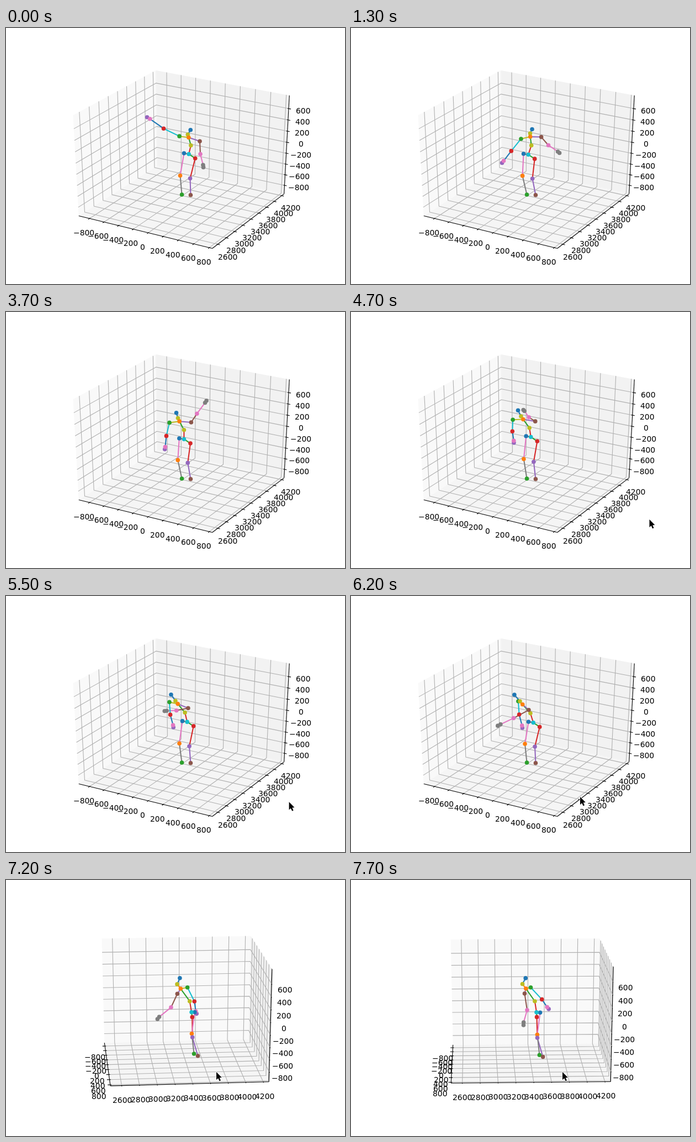
Recreate the animation shown at these times as an HTML page with a canvas. Size 614 by 464 pixels, loop 8 s.

```html
<!DOCTYPE html>
<html lang="en">
<head>
<meta charset="utf-8">
<title>Moving skeleton plot</title>
<style>
html, body { margin: 0; width: 100%; height: 100%; overflow: hidden; background: #fff; }
canvas { display: block; }
</style>
</head>
<body>
<canvas id="stage" width="614" height="464"></canvas>
<script>
const ctx = document.getElementById('stage').getContext('2d');
const LOOP = 8000;

const BLUE = '#1f77b4', ORANGE = '#ff7f0e', GREEN = '#2ca02c', RED = '#d62728', PURPLE = '#9467bd',
      BROWN = '#8c564b', PINK = '#e377c2', GRAY = '#7f7f7f', OLIVE = '#bcbd22', CYAN = '#17becf';
const CYCLE = [BLUE, ORANGE, GREEN, RED, PURPLE, BROWN, PINK, GRAY, OLIVE, CYAN];

// Plot box: a unit cube seen in perspective, padded a little on each side
const HALF = 0.5 + 1 / 48, SPAN = 1719, EYE = 10;
const ORIGIN = [320.7, 232.4], SCALE = [2681, 1997.8];
const AXES = [
  { mid: -56, from: -800, to: 800, dir: 1, pane: '#f9f9f9' },
  { mid: 3369, from: 2600, to: 4200, dir: 0, pane: '#f2f2f2' },
  { mid: -66, from: -800, to: 600, dir: 0, pane: '#f5f5f5' }
];
const TICK = 1 / 12, LABEL_GAP = 0.0738;

// Update moments of the slow first part, then pauses in the 100 ms rhythm
const STEPS = [0, 300, 500, 800, 1000, 1300, 1600, 1900, 2300, 2700, 2900, 3200, 3400, 3700, 4000];
const CURSOR_IN = 4300;
const PAUSES = [[4700, 5000], [5000, 5400], [6700, 6900], [7200, 7500], [7700, LOOP]];

// Key points: time, then azimuth and elevation, screen x and y, or plot x, y, z
const VIEW = [[6200, -60, 30], [6700, -21, 26.3], [7200, -5, 19.5], [7700, -2.1, 16.9]];
const CURSOR = [[4300, 516, 448], [4700, 540.5, 376], [5300, 540.5, 376], [6200, 415, 364],
                [6700, 308, 372], [7200, 381, 348], [7700, 383, 348]];
const BASE = [[0, 0.011, 0.055, 0.001], [1300, -0.032, 0.055, -0.017], [2700, -0.041, 0.055, -0.048],
              [4700, -0.012, 0.055, 0.006], [6200, 0.007, 0.055, -0.006], [7200, 0.007, 0.055, -0.034]];
const SHOULDER_YAW = [[0, 5], [1300, 55], [2700, 57], [4700, 30], [6200, -32], [7200, -32], [7700, -18]];
const HAND_L = [[0, -0.343, 0.1, 0.266], [800, -0.33, 0.1, -0.044], [1300, -0.269, 0.1, -0.197],
                [2700, -0.239, 0.1, -0.283], [4700, -0.173, 0.1, -0.124], [6200, -0.105, 0.1, -0.116],
                [7200, -0.102, 0.1, -0.09], [7700, -0.1, 0.143, -0.037]];
const HAND_R = [[0, 0.128, 0.05, -0.101], [1300, 0.239, 0, 0.105], [2700, 0.349, 0, 0.436],
                [3400, 0.238, 0, 0.499], [4700, 0.02, -0.1, 0.367], [6200, -0.142, -0.164, 0.028],
                [7200, -0.14, -0.166, -0.148], [7700, -0.05, -0.031, -0.174]];

// Feet stand still; knees and elbows bend away from the middle of the limb
const FOOT_L = [-0.0575, 0.079, -0.468], FOOT_R = [0.001, 0.1, -0.466];
const KNEE_BEND = [-0.012, -0.017, -0.01], ELBOW_BEND = [-0.02, 0.021, -0.026];

// Listed from back to front
const DOTS = {
  shoulderL: GREEN, handL: PURPLE, wristL: PINK, elbowL: RED, footL: GREEN, kneeL: ORANGE, hipL: BLUE,
  base: CYAN, mid: OLIVE, head: BLUE, neck: OLIVE, chest: ORANGE,
  footR: BROWN, kneeR: PURPLE, hipR: RED, shoulderR: BROWN, elbowR: PINK, wristR: GRAY, handR: GRAY
};
// Each chain continues the colour cycle
const CHAINS = [
  'head neck chest mid base',
  'chest shoulderR elbowR wristR handR',
  'chest shoulderL elbowL wristL handL',
  'base hipR kneeR footR',
  'base hipL kneeL footL'
].map(chain => chain.split(' '));

const dot = (a, b) => a[0] * b[0] + a[1] * b[1] + a[2] * b[2];
const add = (a, b, k = 1) => a.map((v, i) => v + b[i] * k);
const mix = (a, b, k) => a.map((v, i) => v + (b[i] - v) * k);
const withValue = (p, i, v) => p.map((old, j) => j === i ? v : old);
const clamp01 = v => Math.min(1, Math.max(0, v));

// Linear interpolation between key points, clamped at both ends
function at(keys, t) {
  const n = keys.findIndex(k => k[0] > t);
  if (n === 0) return keys[0].slice(1);
  if (n < 0) return keys[keys.length - 1].slice(1);
  const a = keys[n - 1], b = keys[n];
  return mix(a, b, (t - a[0]) / (b[0] - a[0])).slice(1);
}

function heldTime(ms) {
  if (ms < CURSOR_IN) return STEPS.filter(s => s <= ms).pop();
  const pause = PAUSES.find(([from, to]) => ms >= from && ms < to);
  return pause ? pause[0] : Math.floor(ms / 100) * 100;
}

function pose(t) {
  const p = { base: at(BASE, t), footL: FOOT_L, footR: FOOT_R, handL: at(HAND_L, t), handR: at(HAND_R, t) };

  // The torso tips over to one side while it rocks back and forth
  const tip = 0.034 - 0.077 * clamp01((t - 1300) / 4900);
  const rock = -0.048 + 0.022 * Math.sin(2 * Math.PI * (Math.min(t, 4800) - 600) / 5600);
  p.chest = add(p.base, [tip, rock, 0.2115]);
  p.mid = add(mix(p.base, p.chest, 0.47), [0.004, 0.022, 0]);
  p.neck = add(p.chest, [tip * 0.15, rock * 0.33, 0.0415]);
  p.head = add(p.chest, [tip - 0.02, 0, 0.081]);

  const yaw = at(SHOULDER_YAW, t)[0] * Math.PI / 180;
  const across = [0.075 * Math.cos(yaw), 0.075 * Math.sin(yaw), -0.008];
  const shoulders = add(p.chest, [0, 0.012, -0.018]);
  p.shoulderR = add(shoulders, across);
  p.shoulderL = add(shoulders, across, -1);
  p.hipR = add(p.base, [0.05, 0, -0.03]);
  p.hipL = add(p.base, [-0.053, 0.027, -0.02]);

  for (const side of 'LR') {
    p['wrist' + side] = mix(p['hand' + side], p['shoulder' + side], 0.09);
    p['elbow' + side] = add(mix(p['wrist' + side], p['shoulder' + side], 0.5), ELBOW_BEND);
    p['knee' + side] = add(mix(p['hip' + side], p['foot' + side], 0.5), KNEE_BEND);
  }
  return p;
}

function camera(azim, elev) {
  const a = azim * Math.PI / 180, e = elev * Math.PI / 180;
  const [ca, sa, ce, se] = [Math.cos(a), Math.sin(a), Math.cos(e), Math.sin(e)];
  const toEye = [ce * ca, ce * sa, se], right = [-sa, ca, 0], up = [-se * ca, -se * sa, ce];
  const project = p => {
    const w = EYE - dot(p, toEye);
    return [ORIGIN[0] + SCALE[0] * dot(p, right) / w, ORIGIN[1] - SCALE[1] * dot(p, up) / w];
  };
  return { project, far: toEye.map(v => v > 0 ? -HALF : HALF) };
}

function path(points) {
  ctx.beginPath();
  points.forEach(([x, y]) => ctx.lineTo(x, y));
}

function stroke(points, color, width) {
  path(points);
  ctx.strokeStyle = color;
  ctx.lineWidth = width;
  ctx.stroke();
}

function drawBox({ project, far }) {
  AXES.forEach(({ pane }, i) => {
    const j = (i + 1) % 3, k = (i + 2) % 3;
    path([[-1, -1], [1, -1], [1, 1], [-1, 1]].map(([a, b]) =>
      project(withValue(withValue(far, j, a * HALF), k, b * HALF))));
    ctx.fillStyle = pane;
    ctx.fill();
  });
  AXES.forEach((axis, i) => drawAxis(axis, i, project, far));
}

function drawAxis({ mid, from, to, dir }, i, project, far) {
  const edge = withValue(far, dir, -far[dir]);
  const sign = Math.sign(far[dir]);
  const ticks = [];
  for (let v = from; v <= to; v += 200) ticks.push([v, (v - mid) / SPAN]);

  stroke([-HALF, HALF].map(v => project(withValue(edge, i, v))), '#000', 1.11);

  for (const [, u] of ticks) {
    const back = withValue(far, i, u);
    const ends = [1, 2].map(n => (i + n) % 3).map(j => withValue(back, j, -far[j]));
    stroke([ends[0], back, ends[1]].map(project), '#b0b0b0', 1.11);
  }
  for (const [v, u] of ticks) {
    const pos = withValue(edge, i, u);
    stroke([0.1, -0.2].map(f => project(withValue(pos, dir, pos[dir] + f * sign * TICK))), '#000', 1.11);
    const [x, y] = project(pos.map((c, j) => j === i ? c : c + Math.sign(c) * LABEL_GAP));
    const text = String(v).replace('-', '\u2212');
    ctx.fillStyle = '#000';
    ctx.fillText(text, Math.round(x - ctx.measureText(text).width / 2), Math.round(y + 11));
  }
}

function drawSkeleton({ project }, t) {
  const joints = pose(t), spots = {};
  for (const name in DOTS) spots[name] = project(joints[name]).map(v => v + 0.5);

  let bone = 0;
  for (const chain of CHAINS) {
    for (let i = 1; i < chain.length; i++) {
      stroke([spots[chain[i - 1]], spots[chain[i]]], CYCLE[bone++ % CYCLE.length], 2.08);
    }
  }
  for (const name in DOTS) {
    ctx.beginPath();
    ctx.arc(...spots[name], 3.8, 0, 2 * Math.PI);
    ctx.fillStyle = DOTS[name];
    ctx.fill();
  }
}

function drawCursor([x, y]) {
  ctx.save();
  ctx.translate(x, y);
  path([[0, 0], [0, 14.2], [3.2, 11.3], [5.6, 16.4], [8, 15.3], [5.7, 10.4], [9.8, 10]]);
  ctx.closePath();
  ctx.strokeStyle = '#fff';
  ctx.lineWidth = 1.6;
  ctx.stroke();
  ctx.fillStyle = '#000';
  ctx.fill();
  ctx.restore();
}

function draw(ms) {
  const t = heldTime(ms);
  const cam = camera(...at(VIEW, t));
  ctx.fillStyle = '#fff';
  ctx.fillRect(0, 0, 614, 464);
  ctx.font = "13.89px 'DejaVu Sans', sans-serif";
  ctx.lineJoin = 'round';
  drawBox(cam);
  drawSkeleton(cam, t);
  if (t >= CURSOR_IN) drawCursor(at(CURSOR, t));
}

const start = performance.now();
function tick() {
  draw((performance.now() - start) % LOOP);
  requestAnimationFrame(tick);
}
tick();
</script>
</body>
</html>
```
